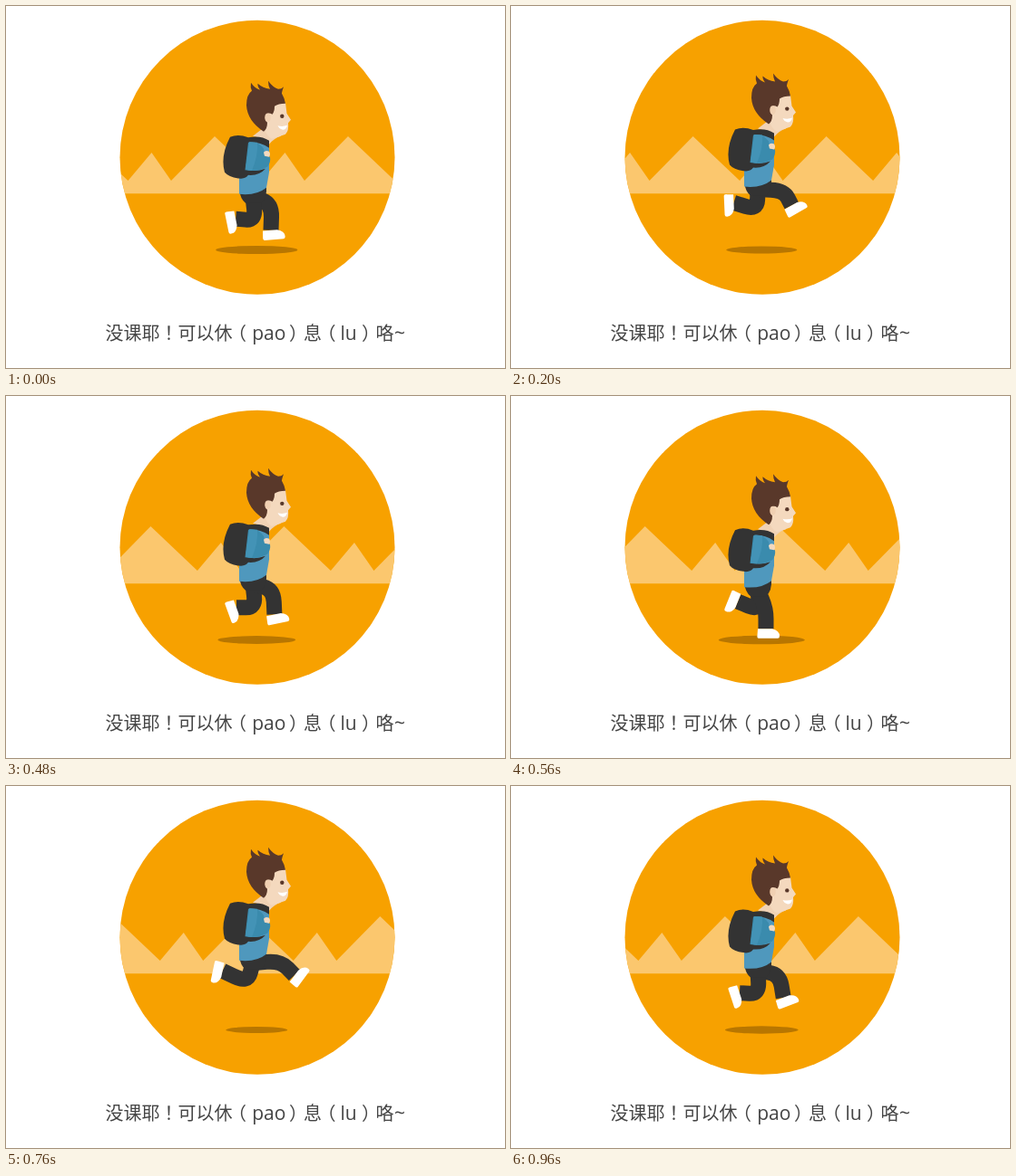
Animation, 550 px wide and 400 px high, one loop 1 s. Source, as an HTML page:

```html
<!DOCTYPE html>
<html lang="zh-CN">
<head>
<meta charset="utf-8">
<title>Runner</title>
<style>
  html, body { margin: 0; width: 100%; height: 100%; overflow: hidden; background: #fff; }
  svg { display: block; width: 550px; height: 400px; }
  text { font: 20px "Noto Sans CJK SC", "Noto Sans CJK", sans-serif; fill: #444; }
  .lat { font: 21px "Open Sans", "Noto Sans", sans-serif; }
  .leg { fill: none; stroke: #333; stroke-width: 17; }
</style>
</head>
<body>
<svg viewBox="0 0 550 400">
  <defs>
    <clipPath id="disc"><circle cx="277" cy="167.3" r="151.5"/></clipPath>
    <path id="shoe" d="M-9 0H7Q15 2 15 8Q15 10.5 13 10.5H-8Q-10 10.5-9.5 7Z" fill="#fff"/>
  </defs>

  <circle cx="277" cy="167.3" r="151.5" fill="#f7a100"/>
  <g clip-path="url(#disc)"><path id="hills" fill="#fbc76e"/></g>
  <ellipse id="shadow" cx="276.3" cy="269.5" fill="#b87600"/>

  <g id="runner">
    <path class="leg"/><use href="#shoe"/>
    <path class="leg"/><use href="#shoe"/>
    <path d="M257.500 184L287 179Q288 192 281 198H264Q258 193 257.500 184Z" fill="#333"/>
    <path d="M257 166L268 127Q284 126 290 132L290 164L287 181Q276 190 257 188Z" fill="#4f98bd"/>
    <path d="M285 114L272 124Q280 125 290 133Q296 126 303 124L296 110Z" fill="#f0d2b5"/>
    <path d="M286 97L295 89L308 87L309.500 99L314 106L311 109.500Q312 118 308 122Q300 125 293 127Q287 124 285 116Z" fill="#f4d9be"/>
    <path d="M247 125Q256 121 267 125.500Q281 123 290 129V137Q280 130 268 130.500L264 161Q275 164 286 160Q279 168 267 167Q265 170.500 259 171Q246 170 241 164Q236 146 247 125Z" fill="#333"/>
    <path d="M267 131Q278 129 284 138L285 146L291 147Q292 153 288 158Q277 164 263.500 161.500Z" fill="#3a8bad"/>
    <path d="M268 131L264 161L271 162Q278 146 277 131Z" fill="#4393b6"/>
    <path d="M284 142Q286 139 290 141Q292 144 290 147L285 146Z" fill="#f4d9be"/>
    <path d="M284 119Q266 107 265 90Q265 78 271 74Q269 70 270 65Q274 71 280 73Q277 69 277.500 66Q283 71 291 72Q289 68 289 63Q294 70 300 72Q304 72 306 69.500Q304 75 304 77Q307 82 308 88Q300 88 296 91Q296 97 293.500 100Q289 97 286 101Q285 106 288 109Q288 116 284 119Z" fill="#59382a"/>
    <ellipse cx="288.500" cy="103.500" rx="3.200" ry="4.800" fill="#f0d0b2"/>
    <circle cx="304.300" cy="102" r="2.200" fill="#59382a"/>
    <path d="M299.500 112.500Q305 114 310 112Q309 117 305 117Q301 116 299.500 112.500Z" fill="#fff"/>
  </g>

  <text y="368.8"><tspan x="109.500">没课耶</tspan><tspan x="174.500">！</tspan><tspan x="189.500">可以休</tspan><tspan x="245">（</tspan><tspan class="lat" x="271.200">pao</tspan><tspan x="312">）</tspan><tspan x="328">息</tspan><tspan x="343.500">（</tspan><tspan class="lat" x="368.500">lu</tspan><tspan x="392">）</tspan><tspan x="407.500">咯</tspan><tspan class="lat" x="428">~</tspan></text>
</svg>

<script>
const LOOP = 1000, STEP = 40, TILE = 147;
const HIP = [272, 191];

// One stride: phase, knee x y, ankle x y, shoe angle
const stride = [
  [0,    293, 199, 292, 228, -5],   // land
  [0.06, 281, 212, 281, 234, 0],    // stand
  [0.19, 272, 214, 247, 207, 84],   // push off
  [0.35, 262, 211, 236, 197, 106],  // trail
  [0.48, 275, 217, 254, 217, 70],   // drop
  [0.56, 274, 214, 250, 204, 112],  // fold
  [0.69, 300, 193, 307, 209, -24],  // swing
  [0.85, 300, 187, 319, 201, -61]   // reach
];

const $ = id => document.getElementById(id);
const hills = $("hills"), shadow = $("shadow"), runner = $("runner");
const tubes = runner.querySelectorAll(".leg"), shoes = runner.querySelectorAll("use");

// Smooth cyclic curve through the stride poses
function pose(phase) {
  const n = stride.length;
  const key = i => {
    const turn = Math.floor(i / n), [p, ...rest] = stride[i - turn * n];
    return [p + turn, ...rest];
  };
  const i = stride.findLastIndex(row => row[0] <= phase);
  const [a, b, c, d] = [-1, 0, 1, 2].map(k => key(i + k));
  const span = c[0] - b[0], u = (phase - b[0]) / span, v = 1 - u;
  return [1, 2, 3, 4, 5].map(k => {
    const m0 = (c[k] - a[k]) / (c[0] - a[0]) * span;
    const m1 = (d[k] - b[k]) / (d[0] - b[0]) * span;
    return v * v * ((1 + 2 * u) * b[k] + u * m0) + u * u * ((1 + 2 * v) * c[k] - v * m1);
  });
}

// Two hops per loop: slow rise, quicker fall
function drop(time) {
  const u = (time * 2 + 0.9) % 1;
  const s = u < 0.6 ? u / 1.2 : 0.5 + (u - 0.6) / 0.8;
  return 11.6 * (1 + Math.cos(2 * Math.PI * s));
}

function poseLeg(i, phase) {
  const [kx, ky, ax, ay, turn] = pose(phase % 1);
  const [hx, hy] = HIP;
  tubes[i].setAttribute("d",
    `M${hx} ${hy}L${(hx + kx) / 2} ${(hy + ky) / 2}Q${kx} ${ky} ${(kx + ax) / 2} ${(ky + ay) / 2}L${ax} ${ay}`);
  shoes[i].setAttribute("transform", `translate(${ax} ${ay}) rotate(${turn})`);
}

let ridge = "M-64 207.3";
for (let x = -64; x < 720; x += TILE)
  ridge += `L${x} 144L${x + 51.5} 193L${x + 77.5} 162L${x + 99} 193`;
hills.setAttribute("d", ridge + "V207.3Z");

function draw(now) {
  const time = Math.floor(now % LOOP / STEP) * STEP / LOOP;
  const dy = drop(time);
  hills.setAttribute("transform", `translate(${-TILE * time} 0)`);
  runner.setAttribute("transform", `translate(0 ${dy})`);
  shadow.setAttribute("rx", 30.5 + 0.74 * dy);
  shadow.setAttribute("ry", 3.2 + 0.07 * dy);
  poseLeg(0, time);
  poseLeg(1, time + 0.5);
}

const start = performance.now();
function tick() {
  draw(performance.now() - start);
  requestAnimationFrame(tick);
}
tick();
</script>
</body>
</html>
```
